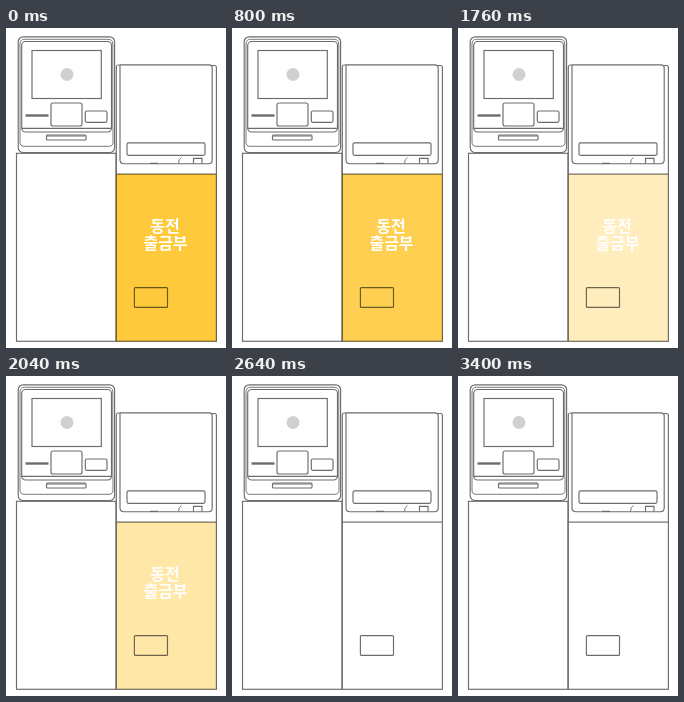
An HTML page that plays this animation: 220x320 px, repeating every 3.44 s.

```html
<!DOCTYPE html>
<html lang="ko">
<head>
<meta charset="utf-8">
<style>
html, body { margin: 0; width: 100%; height: 100%; overflow: hidden; background: #fff; }
svg { display: block; }
#panel { mix-blend-mode: multiply; }
text { font: bold 16px "Noto Sans CJK KR", "Noto Sans CJK", sans-serif; fill: #fff; text-anchor: middle; }
</style>
</head>
<body>
<svg width="220" height="320" viewBox="0 0 220 320">
  <rect width="220" height="320" fill="#fff"/>
  <g fill="none" stroke="#6c6c6c" stroke-width="1.15">
    <!-- left machine -->
    <rect x="12.2" y="8.8" width="96.4" height="115.700" rx="5"/>
    <path d="M14 101V16Q14 11.300 18.500 11.300H102Q106.800 11.300 106.800 16V101" stroke-width=".9"/>
    <rect x="15.700" y="13.500" width="89.800" height="90.500" rx="4"/>
    <path d="M15.500 100.300H105.500"/>
    <path d="M14 101V114Q14 118.300 18 118.300H103Q107 118.300 107 114V101" stroke-width=".9"/>
    <rect x="26" y="22.500" width="69.300" height="48"/>
    <path d="M19.500 87.500H42.500" stroke-width="2.400"/>
    <rect x="45" y="75" width="31" height="23" rx="2"/>
    <rect x="79.300" y="83" width="21.700" height="11.300" rx="1.500"/>
    <rect x="40.500" y="107" width="39.500" height="5" rx="1"/>
    <path d="M41 108H79.500"/>
    <rect x="10.500" y="125.300" width="99.500" height="188"/>
    <!-- right machine -->
    <path d="M110.300 146V39Q110.300 37 112 37H114M206 37.500H208.500Q210.400 37.500 210.400 39.500V146"/>
    <path d="M114 37V132Q114 135.700 118 135.700H202.500Q206.200 135.700 206.200 132V40Q206.200 36.800 203 36.800H114"/>
    <rect x="121" y="114.800" width="78" height="12.500" rx="1.500"/>
    <path d="M175.500 129.500Q172.500 131 172.500 135.500" stroke-width=".9"/>
    <path d="M187.500 135.500V130.300H196V135.500M144 135.300H152"/>
    <rect x="110.200" y="146.100" width="100.200" height="167.200"/>
    <rect x="128.400" y="259.600" width="33.100" height="19.800" rx="1"/>
  </g>
  <rect id="panel" x="110" y="146" width="100.500" height="167.500" fill="#fec93a"/>
  <circle cx="61" cy="46.500" r="6.500" fill="#d0d0d0"/>
  <text x="159" y="203.500">동전</text>
  <text x="159.500" y="221">출금부</text>
</svg>
<script>
const panel = document.getElementById("panel");
const STEP = 40, LOOP = 3440, BLINK = 19, HALF = 9;

function draw() {
  const step = Math.floor(performance.now() % LOOP / STEP);
  panel.style.opacity = Math.abs(step % BLINK - HALF) / HALF;
  requestAnimationFrame(draw);
}
draw();
</script>
</body>
</html>
```
